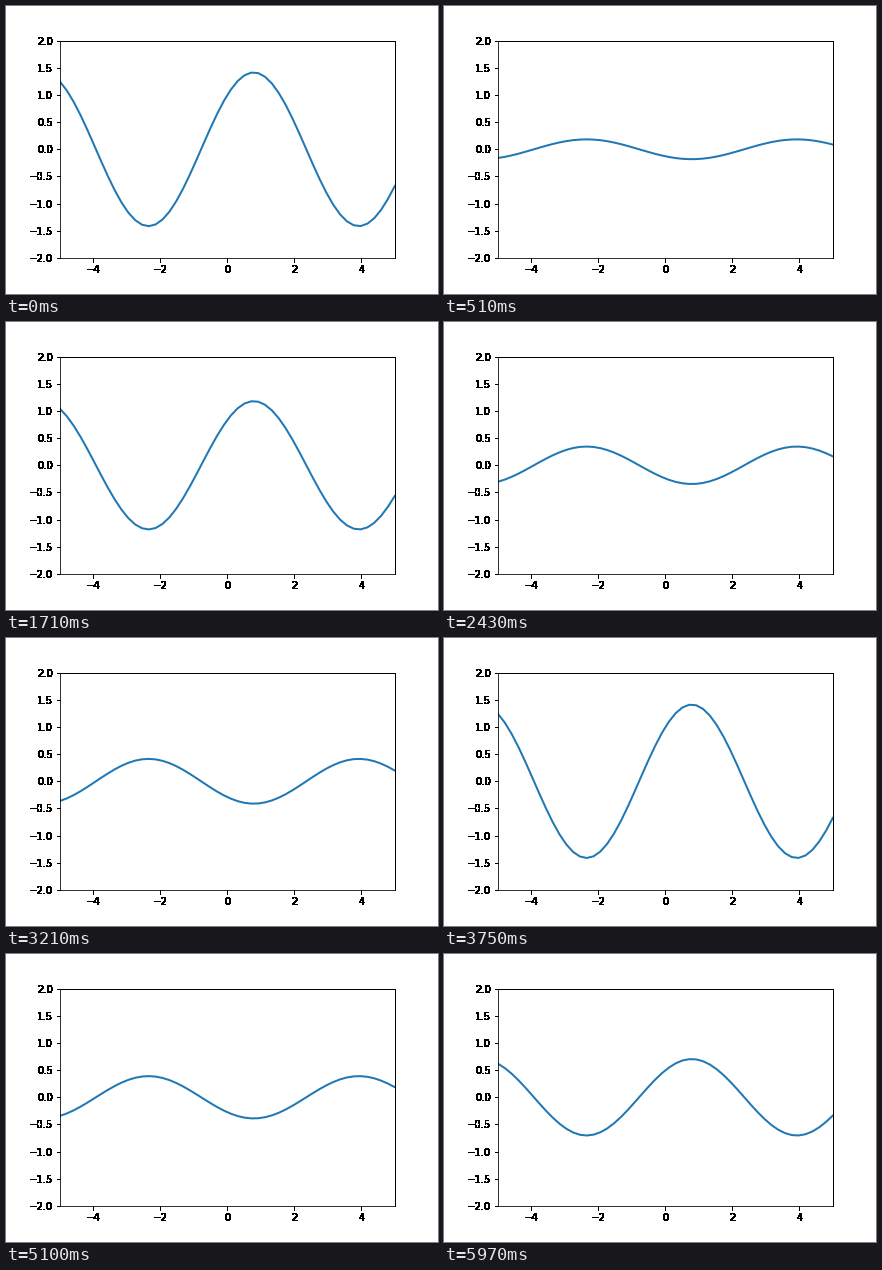
Recreate the animation shown at these times as a matplotlib script. Size 432 px wide and 288 px high, loop 6000 ms.

```python
import numpy as np
import matplotlib.pyplot as plt
from matplotlib.animation import FuncAnimation

FRAMES = 200
INTERVAL = 30


def solid_black(img, dpi):
    """Turn every touched pixel fully black, giving hard, unsmoothed edges."""
    out = np.zeros_like(img)
    out[..., 3] = img[..., 3] > 0
    return out, 0, 0


fig, ax = plt.subplots(figsize=(6, 4), dpi=72, facecolor="white")
fig.subplots_adjust(left=0.125, right=0.9, bottom=0.125, top=0.88)
ax.set_xlim(-5, 5)
ax.set_ylim(-2, 2)
ax.set_xticks(np.arange(-4, 5, 2))
ax.set_yticks(np.arange(-2, 2.5, 0.5))

for axis in (ax.xaxis, ax.yaxis):
    for tick in axis.get_major_ticks():
        tick.label1.set_agg_filter(solid_black)
        tick.tick1line.set_agg_filter(solid_black)
for side in ("top", "right"):
    ax.spines[side].set_agg_filter(solid_black)

x = np.linspace(-5, 5, 50)
wave = np.sin(x) + np.cos(x)
line, = ax.plot(x, wave, lw=2, color="#1f77b4")


def update(i):
    line.set_ydata(wave * np.cos(0.1 * i))
    return line,


anim = FuncAnimation(fig, update, frames=FRAMES, interval=INTERVAL,
                     repeat=True, repeat_delay=0)
plt.show()
```
